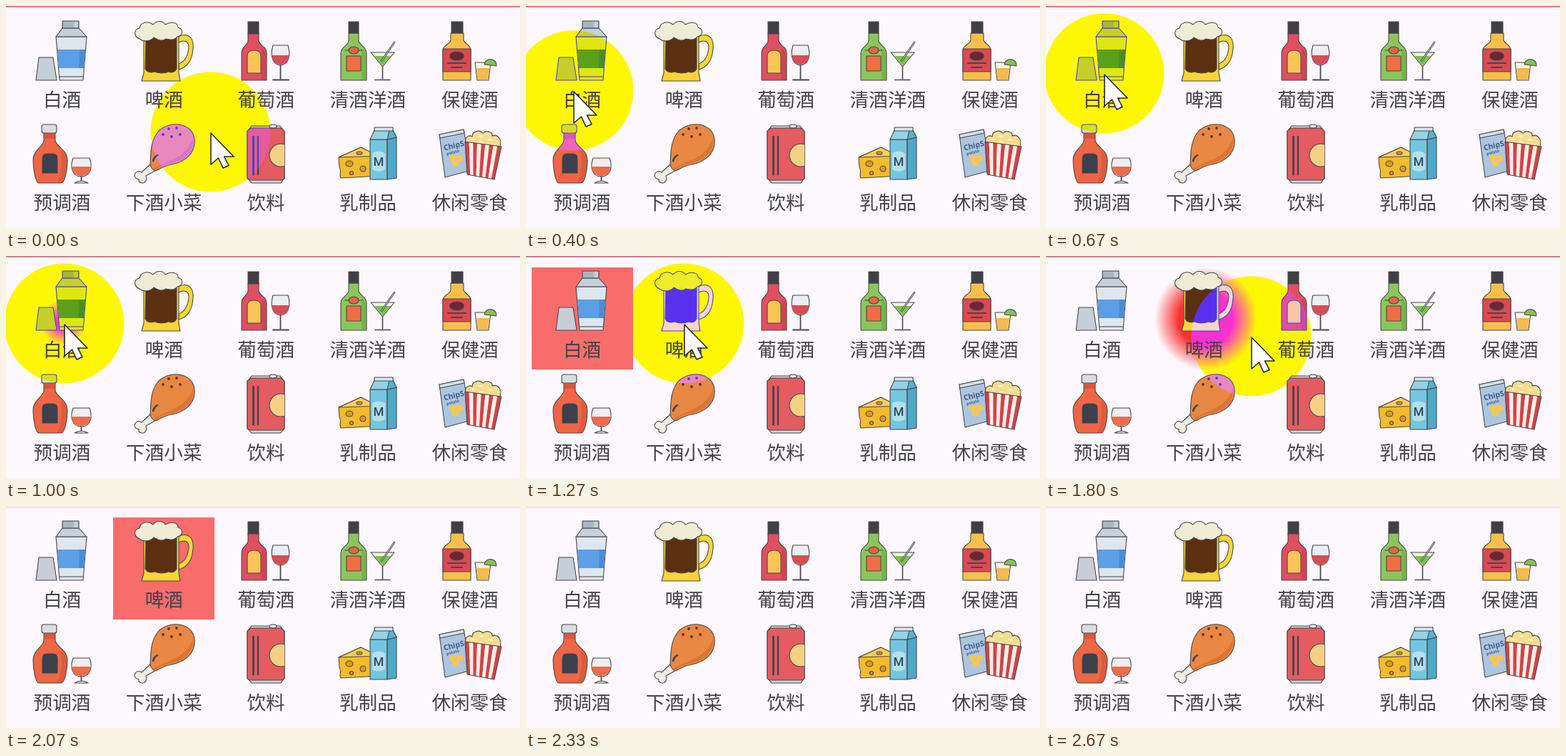
Recreate the animation shown at these times as an HTML page. Size 720 by 311 pixels, loop 2740 ms.

```html
<!DOCTYPE html>
<html lang="zh-CN">
<head>
<meta charset="utf-8">
<title>酒水分类</title>
<style>
html, body { margin: 0; width: 100%; height: 100%; overflow: hidden; background: #fdf8fe; }
svg { display: block; width: 720px; height: 311px; isolation: isolate; }
#icons { stroke: #4a474d; stroke-width: 1.1; stroke-linejoin: round; stroke-linecap: round; }
#icons .n, #icons .n * { stroke: none; }
#icons .l { fill: none; }
#labels { font: 300 26.6px "Noto Sans CJK SC", "Noto Sans CJK", sans-serif; fill: #454249; text-anchor: middle; }
#spot { mix-blend-mode: difference; }
</style>
</head>
<body>
<svg viewBox="0 0 720 311">
<defs>
  <clipPath id="canClip"><path d="M339 176h51v66h-51z"/></clipPath>
  <clipPath id="besideCell"><path d="M150 0h570v311h-570z"/></clipPath>
</defs>
<rect width="720" height="311" fill="#fdf8fe"/>
<rect id="strip" width="720" height="2" fill="#d0808a"/>
<rect id="paleStrip" width="720" height="3" fill="#fae4e8"/>
<g id="glows"></g>

<g id="icons">
  <!-- shaker and cup -->
  <path d="M46 72H66L71 104H42Z" fill="#c6ced7"/>
  <path d="M70 43H113L108 104H75Z" fill="#dfe6ee"/>
  <path d="M79 31H102L113 43H70Z" fill="#c6d0da"/>
  <path d="M79 21H102V31H79Z" fill="#a9b5c0"/>
  <path class="n" d="M95 22H101V30H95Z" fill="#c4ced8"/>
  <path class="n" d="M72 61H111L109 87H74Z" fill="#5c9fe6"/>
  <path class="n" d="M103 61H111L109 87H102Z" fill="#4a8cd9"/>
  <path class="l" d="M75 99H108"/>

  <!-- beer -->
  <path d="M241 43C256 36 263 45 262 59C261 76 254 86 242 89V81C250 78 255 70 256 58C256 49 250 47 242 51Z" fill="#f8d634"/>
  <path d="M193 40H242V94L244 105H190L193 94Z" fill="#fad437"/>
  <path d="M196 45H239V88Q235 95 228 92Q218 96 208 92Q199 95 195 88Z" fill="#5a3010"/>
  <path d="M187 46C179 43 178 33 187 31C188 23 199 20 206 26C211 19 221 21 223 26C231 21 241 23 241 30C249 32 248 42 240 43C235 50 227 46 224 46C218 51 211 46 207 44C203 49 193 51 187 46Z" fill="#efecd6"/>

  <!-- red wine -->
  <path d="M339 38H354V49C356 57 365 56 365 66V104H330V66C330 56 338 57 339 49Z" fill="#e14f60"/>
  <path class="n" d="M358 60Q364 61 364 67V103H358Z" fill="#d04455"/>
  <path d="M339 22H354V39H339Z" fill="#3e4046"/>
  <path d="M338 94V70Q338 62 347.500 62T357 70V94Z" fill="#f9c556"/>
  <path d="M374 55H395C400 72 394 83 384.500 83S369 72 374 55Z" fill="#eceff2"/>
  <path class="n" d="M372.300 69H396.700C396 78 391 82 384.500 82S373 78 372.300 69Z" fill="#d84c57"/>
  <path class="l" d="M384.500 83V102M374 103.500H396" stroke-width="1.800"/>

  <!-- spirits -->
  <path d="M480 38H494V49C496 56 505 57 505 66V104H469V66C469 57 479 56 480 49Z" fill="#8bc65c"/>
  <path class="n" d="M498 60Q504 61 504 67V103H498Z" fill="#78b44a"/>
  <path d="M480 22H494V38H480Z" fill="#3e4046"/>
  <path d="M477 70H497V91H477Z" fill="#ee6e48"/>
  <ellipse cx="487" cy="62" rx="7" ry="5" fill="#e8653f"/>
  <path class="l" d="M475 62h5M494 62h5"/>
  <path d="M511 65H544L527.500 85Z" fill="#eef4ec"/>
  <path class="n" d="M516 70H539L527.500 84Z" fill="#7cc14c"/>
  <path class="l" d="M544 51L526 77" stroke-width="2.600"/>
  <path class="l" d="M544 51L526 77" stroke="#d8dcd8" stroke-width="1"/>
  <path class="l" d="M527.500 85V102M517 103.500H538" stroke-width="1.600"/>

  <!-- tonic -->
  <path d="M623 38H641V48C643 54 651 54 651 62V104H612V62C612 54 622 54 623 48Z" fill="#f8c04a"/>
  <path d="M624 22H640V38H624Z" fill="#3e4046"/>
  <path d="M612 60H651V92H612Z" fill="#db4a54"/>
  <ellipse cx="631.500" cy="70" rx="10" ry="6" fill="#6b2630"/>
  <path class="l" d="M619 80H644M624 86H639" stroke-width="2"/>
  <path d="M657 79H679L676 104H660Z" fill="#f7f3ec"/>
  <path class="n" d="M658.700 87H677.300L675.500 103H660.500Z" fill="#f6ba50"/>
  <path d="M670 82A8.500 8.500 0 0 1 687 84Z" fill="#86bf57"/>

  <!-- cocktail bottle -->
  <path d="M53 177H69V189C72 198 86 202 86 216C86 231 82 248 77 248H46C42 248 38 231 38 216C38 202 51 198 53 189Z" fill="#ee6645"/>
  <path class="n" d="M76 202C83 206 85 211 85 217C85 231 81 246 77 247H72C78 236 80 215 76 202Z" fill="#de5a3b"/>
  <path class="n" d="M54 179H68V186H54Z" fill="#da5639"/>
  <rect x="50" y="166" width="21" height="12" rx="3" fill="#d9dddf"/>
  <path d="M51 234V214Q51 207 57 207H66Q72 207 72 214V234Z" fill="#3a404c"/>
  <path d="M94 213H117C122 226 118 239 105.500 239S89 226 94 213Z" fill="#f0eeee"/>
  <path class="n" d="M92.300 225H118.700C118 234 113 238 105.500 238S93 234 92.300 225Z" fill="#ec6c4b"/>
  <path class="l" d="M105.500 239V246" stroke-width="1.800"/>
  <path d="M96 248Q105.500 242 115 248Z" fill="#dfe0e2"/>

  <!-- drumstick -->
  <path d="M203 221L190 233C184 229 178 235 181 240C183 243 185 242 186 243C185 248 193 250 196 245C198 242 196 239 196 238L212 229Z" fill="#eeede4"/>
  <path d="M202 222C203 206 202 188 214 175C229 160 262 163 264 187C266 207 249 219 232 222C221 224 217 227 210 231C206 230 203 227 202 222Z" fill="#e98843"/>
  <path class="n" d="M262 185C264 206 249 217 231 220.500C220 222.500 216 225 210 229.500L206 228C226 216 252 214 262 185Z" fill="#da7636"/>
  <path class="l" d="M206 217q2-6 6-8" stroke-width="2.600"/>
  <g class="n" fill="#5c3424" id="spots"></g>

  <!-- can -->
  <path d="M344 168H384L390 176V241L385 248H344L338 241V176Z" fill="#cfd6dc"/>
  <path d="M338 175L343 171H385L390 175V242L386 244H342L338 242Z" fill="#e25c60"/>
  <path class="l" d="M346.500 183V236" stroke-width="3"/>
  <path class="l" d="M353 183V236" stroke-width="2.400"/>
  <circle cx="385" cy="209" r="16" fill="#f5cf84" clip-path="url(#canClip)"/>
  <ellipse cx="374" cy="168.500" rx="5" ry="2.500" fill="#e6eaee"/>

  <!-- cheese and milk -->
  <path d="M466 212L497 198L522 210V238L469 241C466 236 471 232 467 226Z" fill="#f3bb2e"/>
  <path d="M466 212L497 198L522 210Z" fill="#f8cf55"/>
  <g fill="#d99a20"><ellipse cx="481" cy="221" rx="5" ry="4"/><circle cx="500" cy="228" r="4"/><circle cx="484" cy="234" r="2.500"/><ellipse cx="495" cy="206" rx="4" ry="2"/></g>
  <path d="M510 187H534V243H510Z" fill="#74c6e0"/>
  <path d="M534 187L547 184V241L534 243Z" fill="#4fa8ca"/>
  <path d="M516 174H542L547 184L534 187H510Z" fill="#94d3e6"/>
  <path d="M537 174H542L547 184L534 187Z" fill="#58b2d2"/>
  <path d="M516 170H542V175H516Z" fill="#d3e8ef"/>
  <path class="n" d="M513 206Q521 201 531 206V229Q521 234 513 229Z" fill="#b4dfeb"/>
  <text class="n" x="522" y="224" font-family="Roboto, sans-serif" font-size="17" font-weight="500" fill="#2e4c60" text-anchor="middle">M</text>

  <!-- snacks -->
  <path d="M607 180L641 173L652 230L615 240Z" fill="#adc5df"/>
  <path d="M607 180L641 173L642 178L608 185Z" fill="#d2e0ed"/>
  <g class="n" transform="rotate(-14 628 197)" font-family="Noto Sans, sans-serif" font-weight="bold" fill="#3d5f87">
    <text x="613" y="199" font-size="10.500">ChipS</text>
    <text x="615" y="206" font-size="5.500">potato</text>
  </g>
  <path class="n" d="M621 211q7-5 10 1q-2 8-9 5zM631 209q9-2 10 5q-5 6-10 3zM625 218q8-3 11 3q-5 6-11 2z" fill="#f5c656"/>
  <path d="M644 192C642 184 648 180 653 183C653 175 664 173 668 178C674 173 682 177 681 182C690 179 695 188 692 197Z" fill="#f5dc90"/>
  <path class="n" d="M650 188q4-5 8 0zM661 183q5-5 8 1zM674 188q4-5 9 1zM662 191q5-4 8 1z" fill="#fff4cf"/>
  <g id="bucket"></g>
</g>

<g id="spot"><circle id="disc" cx="-0.500" cy="-1.700" r="84" fill="#00f"/></g>
<g id="labels"></g>
<path id="arrow" d="M0 0V44L10.500 35L17 49L25 45.500L18.500 33H32Z" fill="#fff" stroke="#2a272d" stroke-width="1.600" stroke-linejoin="round"/>
</svg>

<script>
const $ = id => document.getElementById(id);
const set = (el, attrs) => {
  for (const k in attrs) el.setAttribute(k, attrs[k]);
  return el;
};
const add = (parent, tag, attrs) =>
  parent.appendChild(set(document.createElementNS('http://www.w3.org/2000/svg', tag), attrs));
const clamp = v => Math.max(0, Math.min(1, v));
const mix = (a, b, k) => a + (b - a) * k;

['白酒', '啤酒', '葡萄酒', '清酒洋酒', '保健酒', '预调酒', '下酒小菜', '饮料', '乳制品', '休闲零食']
  .forEach((name, i) => {
    add($('labels'), 'text', { x: 78.500 + i % 5 * 142.800, y: i < 5 ? 141 : 284.500 }).textContent = name;
  });

[[220, 180], [228, 172], [239, 171], [232, 183], [244, 180]]
  .forEach(([cx, cy]) => add($('spots'), 'circle', { cx, cy, r: 1.900 }));

// striped popcorn bucket
const stripes = 9;
const topAt = k => `${mix(643, 694, k)} ${mix(190, 197, k)}`;
const footAt = k => `${mix(646, 684, k)} ${mix(236, 243, k)}`;
const band = (a, b) => `M${topAt(a)}L${topAt(b)}L${footAt(b)}L${footAt(a)}Z`;
for (let i = 0; i < stripes; i++) {
  add($('bucket'), 'path', {
    class: 'n', fill: i % 2 ? '#f8efea' : '#d04448', d: band(i / stripes, (i + 1) / stripes)
  });
}
add($('bucket'), 'path', { class: 'l', d: band(0, 1) });

// tap glows: cell corner, tap point, start and release time
const taps = [
  { x: 8, y: 16, cx: 80, cy: 93, start: 930, end: 1470 },
  { x: 150, y: 16, cx: 224, cy: 88, start: 1640, end: 2200 }
];
taps.forEach((tap, i) => {
  tap.grad = add(document.querySelector('defs'), 'radialGradient', {
    id: 'glow' + i, gradientUnits: 'userSpaceOnUse', cx: tap.cx, cy: tap.cy
  });
  const stop = (offset, alpha) => add(tap.grad, 'stop', { offset, 'stop-opacity': alpha });
  tap.core = stop(0, 1);
  stop(1, 0);
  tap.box = add($('glows'), 'rect', {
    x: tap.x, y: tap.y, width: 142, height: 143, fill: `url(#glow${i})`
  });
});

// pointer: time, x, y, eased arrival
const path = [
  [0, 287, 178], [400, 67, 120, 1], [600, 82, 96, 1], [1030, 82, 96],
  [1270, 222, 96, 1], [1670, 222, 96], [1800, 288, 114], [2000, 420, 410], [2740, 420, 410]
];
function pointerAt(t) {
  const i = path.findIndex(p => p[0] > t);
  const [t0, x0, y0] = path[i - 1], [t1, x1, y1, eased] = path[i];
  let k = (t - t0) / (t1 - t0);
  if (eased) k = k * k * (3 - 2 * k);
  return [mix(x0, x1, k), mix(y0, y1, k)];
}

const loop = 2740, fps = 15;
function draw(now) {
  const step = Math.min(40, Math.floor(now % loop * fps / 1000 + 0.1));
  const t = step * 1000 / fps + 0.01;
  const place = { transform: `translate(${pointerAt(t).join(' ')})` };
  set($('arrow'), place);
  set($('disc'), place);
  // the disc stays beside the fully lit first cell
  set($('spot'), { 'clip-path': t > 1240 && t < 1470 ? 'url(#besideCell)' : 'none' });

  for (const tap of taps) {
    const age = t - tap.start;
    const r = Math.max(0.01, age * 0.450);
    // starts as a deep red and settles to the cell colour
    const tone = mix(50, 108, clamp((age - 160) / 150));
    set(tap.grad, { r });
    set(tap.core, { offset: Math.max(0.3, (r - 34) / r) });
    for (const s of tap.grad.children) set(s, { 'stop-color': `rgb(249, ${tone}, ${tone})` });
    tap.box.setAttribute('opacity', age < 0 ? 0 : 1 - clamp((t - tap.end) / 130));
  }

  const late = t > 1990;
  set($('strip'), { opacity: late ? 0 : 1 });
  set($('paleStrip'), { opacity: late ? 1 : 0 });
}

const begin = performance.now();
function tick() {
  draw(performance.now() - begin);
  requestAnimationFrame(tick);
}
tick();
</script>
</body>
</html>
```
